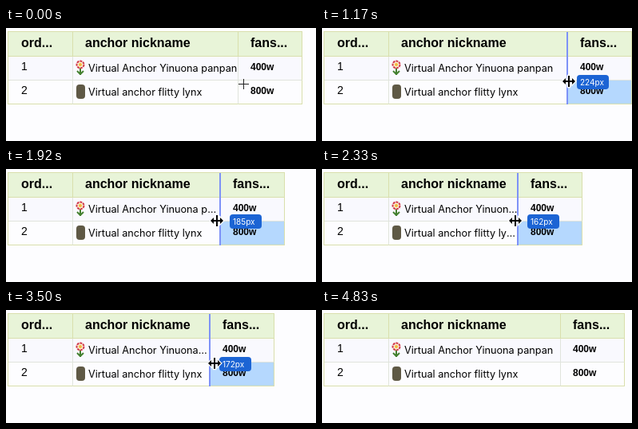
Recreate the animation shown at these times as an HTML page. Size 388 by 142 pixels, loop 5160 ms.

```html
<!DOCTYPE html>
<html lang="en">
<head>
<meta charset="utf-8">
<title>Column resize</title>
<style>
html, body { margin: 0; width: 100%; height: 100%; overflow: hidden; background: #fdfdff; }
#stage { position: relative; width: 388px; height: 142px; overflow: hidden; color: #000;
  font: 14px "Liberation Sans", Arial, sans-serif; }
#table { position: absolute; left: 2px; top: 4px; display: grid;
  grid-template: 31px 30px 30px / 81px var(--w) 80px;
  border: solid #d9dfac; border-width: 1px 0 0 1px; }
#table div { box-sizing: border-box; min-width: 0; padding-left: 15px; line-height: 25px;
  border: solid #e0e4dc; border-width: 0 1px 1px 0;
  white-space: nowrap; overflow: hidden; text-overflow: ellipsis; background: #fdfdff; }
#table .head { padding-right: 14px; background: #e8f4d8; border-color: #d9dfac;
  font-weight: bold; font-size: 16px; line-height: 28px; }
#table .order { padding-left: 16px; }
#table .odd { background: #f9f9fe; }
#table .name { padding: 0 0 0 19px; font: 12.7px/29px Inter, sans-serif; }
#table .fans { padding-right: 0; text-overflow: clip; border-right-color: #d9dfac; }
#table .count { font-weight: bold; font-size: 12px; line-height: 26px; }
#table .last { border-bottom-color: #d9dfac; }
#table .selected { background: #b5d8fe; }
#guide { position: absolute; left: calc(82px + var(--w)); top: 5px; width: 2px; height: 91px; background: #7e92f7; }
#label { position: absolute; left: calc(95px + var(--w)); box-sizing: border-box; width: 40px; height: 18px;
  padding-left: 4px; border-radius: 4px; background: #1c64d4; color: #fff; font: 10px/19px Inter, sans-serif; }
svg { position: absolute; left: 0; top: 0; }
</style>
</head>
<body>
<div id="stage">
  <div id="table">
    <div class="head order">ord...</div><div class="head">anchor nickname</div><div class="head fans">fans...</div>
    <div class="order odd">1</div><div class="name odd">Virtual Anchor Yinuona panpan</div><div class="fans count odd">400w</div>
    <div class="order last">2</div><div class="name last">Virtual anchor flitty lynx</div><div class="fans count last" id="cell">800w</div>
  </div>
  <svg width="388" height="142">
    <path d="M93 50V59M93 58L89 54M93 58L97 54" stroke="#43802f" stroke-width="2"/>
    <circle cx="93" cy="46" r="4.5" fill="#f8ecd0" stroke="#d23a4c" stroke-width="2" stroke-dasharray="3 1"/>
    <circle cx="93" cy="46" r="2" fill="#f2b83a"/>
    <rect x="88" y="71" width="11" height="18" rx="4" fill="#5f5945"/>
  </svg>
  <div id="guide"></div>
  <div id="label"></div>
  <svg width="388" height="142">
    <path id="cross" d="M-6.5 0H6.5M0 -6.5V6.5" stroke="#222"/>
    <path id="resize" d="M-1 -7H1V-1H4V-4L8 0L4 4V1H1V7H-1V1H-4V4L-8 0L-4 -4V-1H-1Z"
      stroke="#fff" stroke-width="2.5" paint-order="stroke"/>
  </svg>
</div>
<script>
const LOOP = 5160, STEP = 1000 / 12;
const DRAG_START = 11, RELEASE = 55;
const el = id => document.getElementById(id);

// Keys are [step, value], at twelve steps per second.
const widths = [[10, 207], [14, 224], [16, 226], [17, 226], [23, 185], [24, 179], [31, 149],
  [33, 138], [34, 137], [35, 137], [42, 172], [49, 214], [50, 215]];
const heights = [[10, 67], [17, 67], [23, 65], [35, 65], [42, 67], [50, 69]];
const exitPath = [[302, 77], [308, 100], [315, 128]];

function valueAt(keys, step) {
  const next = keys.findIndex(key => key[0] >= step);
  if (next < 0) return keys[keys.length - 1][1];
  if (next === 0) return keys[0][1];
  const [s0, v0] = keys[next - 1], [s1, v1] = keys[next];
  return v0 + (v1 - v0) * (step - s0) / (s1 - s0);
}

function pointerAt(step) {
  if (step < 3) return [297.5, 70.5];
  if (step < 5) return [302.5, 80.5];
  if (step < DRAG_START) return [290, 67];
  if (step >= RELEASE) return exitPath[step - RELEASE] || [320, 170];
  // The pointer leads the column edge slightly.
  return [84 + Math.round(valueAt(widths, step + 0.8)), Math.round(valueAt(heights, step))];
}

function show(node, visible) {
  node.style.visibility = visible ? "visible" : "hidden";
}

function draw(now) {
  const step = Math.floor((now % LOOP + 5) / STEP);
  const width = Math.round(valueAt(widths, step));
  const [x, y] = pointerAt(step);
  const dragging = step >= DRAG_START && step < RELEASE;
  const resizing = step >= 5 && step < RELEASE;

  el("stage").style.setProperty("--w", width + "px");
  el("cell").classList.toggle("selected", step >= 6 && step < RELEASE);
  el("label").textContent = width + "px";
  el("label").style.top = y - 8 + "px";
  show(el("guide"), dragging);
  show(el("label"), dragging);
  show(el("resize"), resizing);
  show(el("cross"), !resizing);
  for (const id of ["resize", "cross"]) el(id).setAttribute("transform", `translate(${x} ${y})`);
}

function tick() {
  draw(performance.now() - start);
  requestAnimationFrame(tick);
}
const start = performance.now();
tick();
</script>
</body>
</html>
```
